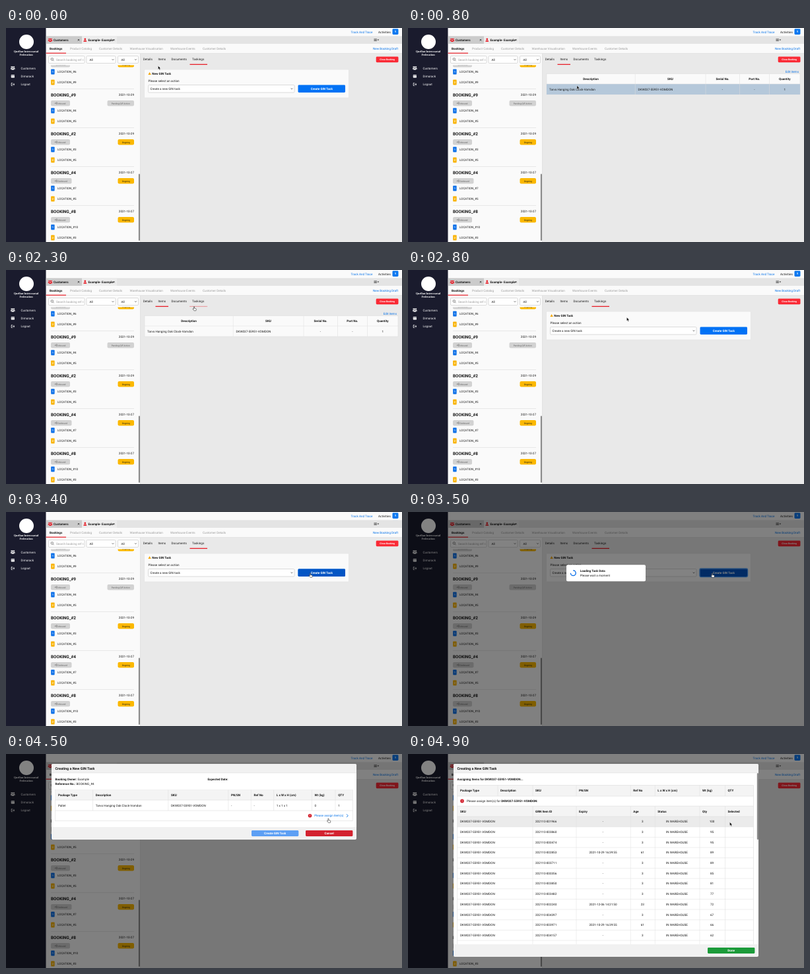
Write an HTML page that moves like this. It is 600 px wide and 325 px high and loops after 5000 ms.

```html
<!DOCTYPE html>
<html lang="en">
<head>
<meta charset="utf-8">
<title>Warehouse bookings</title>
<style>
html, body { margin: 0; width: 100%; height: 100%; overflow: hidden; background: #e9e9e9; }
svg { display: block; width: 600px; height: 325px; font-family: Roboto, sans-serif; text-rendering: geometricPrecision; }
text { white-space: pre; }
</style>
</head>
<body>
<svg id="stage" viewBox="0 0 600 325"></svg>
<script>
const INK = '#161616', BLUE = '#0070e8', RED = '#e8202a', LINE = '#dcdcdc';
const SKU = 'DKW037-55951-VOMDON', ITEM = 'Tarvo Hanging Oak Clock-Vomdon';

const text = (s, x, y, { fill = INK, size = 4.6, weight = 400, anchor = 'start', more = '' } = {}) =>
  `<text x="${x}" y="${y}" fill="${fill}" font-size="${size}" font-weight="${weight}" text-anchor="${anchor}" ${more}>${s}</text>`;
const bold = (s, x, y, o) => text(s, x, y, { weight: 700, ...o });
const mid = (s, x, y, o) => text(s, x, y, { anchor: 'middle', ...o });
const box = (x1, y1, x2, y2, fill, r = 0, more = '') =>
  `<rect x="${x1}" y="${y1}" width="${x2 - x1}" height="${y2 - y1}" rx="${r}" fill="${fill}" ${more}/>`;
const path = (d, stroke = INK, width = .6, fill = 'none', more = '') =>
  `<path d="${d}" stroke="${stroke}" stroke-width="${width}" fill="${fill}" ${more}/>`;
const dot = (x, y, r, fill) => `<circle cx="${x}" cy="${y}" r="${r}" fill="${fill}"/>`;
const group = (id, ...parts) => `<g id="${id}">${parts.join('')}</g>`;
const columns = (xs, y1, y2) => path(xs.map(x => `M${x} ${y1}V${y2}`).join(''), LINE, .5);
const chevron = (x, y) => path(`M${x - 1.2} ${y - .6}l1.2 1.2 1.2-1.2`, INK, .7);
const button = (label, x1, y1, x2, y2, fill, size = 4.6) =>
  box(x1, y1, x2, y2, fill, 1.4) +
  mid(label, (x1 + x2) / 2, (y1 + y2) / 2 + size * .35, { fill: '#fff', size, weight: 700 });
const select = (label, x1, y1, x2, y2, tx) =>
  box(x1, y1, x2, y2, '#fff', 1.4, 'stroke="#c4c4c4" stroke-width=".6"') +
  text(label, tx, (y1 + y2) / 2 + 1.6) + chevron(x2 - 4, (y1 + y2) / 2);
const people = (x, y, fill) => [[-2, -.6, 1], [2, -.6, 1], [0, 0, 1.3]].map(([dx, dy, k]) =>
  dot(x + dx, y + dy - 1.2 * k, .9 * k, fill) +
  path(`M${x + dx - 1.5 * k} ${y + dy + 2 * k}q0-2 ${1.5 * k}-2t${1.5 * k} 2z`, 'none', 0, fill)).join('');
const alertDot = (x, y) => dot(x, y, 2.8, '#d3222f') + mid('!', x, y + 1.4, { fill: '#fff', size: 4, weight: 700 });

function sidebar() {
  const white = { fill: '#fff' }, serif = { ...white, size: 4.3, weight: 700, more: 'font-family="Liberation Serif, serif"' };
  return box(0, 0, 60.7, 325, '#1a1b2d') + dot(31, 21, 11, '#fff') +
    mid('Quellan Intercoastal', 30.5, 37.4, serif) + mid('Federation', 30.5, 42.4, serif) +
    people(10.3, 61, '#fff') +
    box(7.7, 71, 13, 75.4, '#fff', .7) + path('M7.7 72.6h5.3', '#1a1b2d', .6) +
    path('M9.8 83.6h-1.6v4h1.6M9.6 85.6h3M11.4 84l1.6 1.6-1.6 1.6', '#fff', .8) +
    text('Customers', 22.5, 62.6, white) + text('Dimorack', 22.5, 75, white) + text('Logout', 22.5, 87.4, white);
}

function topBars() {
  const gray = { fill: '#9a9a9a' };
  return box(60.7, 0, 600, 12.5, '#fafafa') + box(60.7, 12.5, 600, 24, '#e4e4e4') +
    text('Track And Trace', 522.5, 7.6, { fill: BLUE }) + text('Activities', 564, 8) +
    box(585.5, 1.3, 594.5, 10, '#0b78f0', 1.4) + mid('9', 590, 7.4, { fill: '#fff' }) +
    box(60.7, 12.5, 115, 24, '#cbcbcb') + box(115, 12.5, 168, 24, '#ececec') +
    people(67, 18.4, RED) + bold('Customers', 72, 20) +
    dot(119.8, 16.9, 1.4, RED) + path('M117.3 20.8q0-2.4 2.5-2.4t2.5 2.4z', 'none', 0, RED) +
    bold('Example- Example', 124.5, 20) +
    [110, 163.5].map(x => path(`M${x - 1.2} 17l2.4 2.4m0-2.4l-2.4 2.4`, INK, .7)).join('') +
    path('M557.5 16.8h4.4m-4.4 1.3h4.4m-4.4 1.3h4.4', INK, .6) + path('M562.6 17.4h2.6l-1.3 1.6z', 'none', 0, INK) +
    box(60.7, 24, 600, 38.5, '#fafafa') + path('M60.7 38.6H600', LINE, .6) +
    bold('Bookings', 66, 33) + box(60.7, 37.6, 91, 38.8, RED) +
    [['Product Catalog', 97], ['Customer Details', 141], ['Warehouse Visualisation', 187.5],
     ['Warehouse Events', 249], ['Customer Details', 298]].map(([s, x]) => text(s, x, 33, gray)).join('') +
    text('New Booking Draft', 556, 33.2, { fill: BLUE });
}

function booking([id, date, way, status, from, to], i) {
  const y = 43 + 59 * i, small = { size: 3.3, fill: '#5c5c5c' }, pending = status !== 'Ongoing';
  const pin = (n, cy, fill) => box(68.2, cy - 4, 73.6, cy + 4, fill, .7) +
    mid(n, 70.9, cy + 1.4, { fill: '#fff', size: 4, weight: 700 });
  return bold('BOOKING_#' + id, 68, y + 2.4, { size: 6.4 }) + text('2021-10-' + date, 194, y + .8, { anchor: 'end' }) +
    box(68, y + 8, 97 + (way === 'Outbound' ? 2.5 : 0), y + 16.6, '#d2d2d2', 2) +
    path(`M73.5 ${y + 12.3}h2.6m-1-1l1 1-1 1M76.2 ${y + 10.8}h1v3h-1`, '#5c5c5c', .5) + text(way, 78.5, y + 13.5, small) +
    box(pending ? 153.5 : 169.5, y + 8, 194, y + 16.6, pending ? '#d2d2d2' : '#fbb800', 2) +
    mid(status, pending ? 173.8 : 181.8, y + 13.5, pending ? small : { size: 3.3 }) +
    pin(1, y + 23.5, '#0b6fe8') + text('LOCATION_#' + from, 78, y + 25.2, { size: 4.5 }) +
    pin(2, y + 39.5, '#f9b200') + text('LOCATION_#' + to, 78, y + 41.1, { size: 4.5 }) +
    path(`M68 ${y + 49.5}H194`, LINE, .6);
}

function bookingList() {
  const rows = [[7, 29, 'Inbound', 'Ongoing', 6, 9], [9, 29, 'Inbound', 'Pending QIF Action', 4, 5],
    [2, 29, 'Inbound', 'Ongoing', 3, 5], [4, 27, 'Outbound', 'Ongoing', 7, 5], [8, 27, 'Inbound', 'Ongoing', 10, 3]];
  return box(60.7, 39, 203.5, 325, '#fafafa') +
    `<clipPath id="list"><rect x="61" y="56.5" width="140" height="269"/></clipPath>` +
    `<clipPath id="field"><rect x="65" y="42" width="52.5" height="12"/></clipPath>` +
    `<g clip-path="url(#list)">${rows.map(booking).join('')}</g>` +
    box(64.5, 42.5, 119, 53.5, '#fff', 1.4, 'stroke="#c4c4c4" stroke-width=".6"') +
    path('M71 48.6l1.6 1.6M71.5 47.3a1.7 1.7 0 1 1-3.4 0a1.7 1.7 0 1 1 3.4 0', '#555', .7) +
    text('Search booking ref no.', 76, 49.6, { fill: '#999', more: 'clip-path="url(#field)"' }) +
    select('All', 122, 42.5, 166, 53.5, 126.5) + select('All', 169.5, 42.5, 200.5, 53.5, 174.5) +
    box(200.9, 221.5, 203, 323, '#8b8b8b', 1) + path('M203.6 39V325', '#d0d0d0', .5);
}

function itemsTab() {
  const heads = [['Description', 277], ['SKU', 397.5], ['Serial No.', 476.5], ['Part No.', 524.8], ['Quantity', 570.8]];
  return box(226.5, 54.7, 246, 56, RED) + text('Edit items', 592, 67.8, { fill: BLUE, anchor: 'end' }) +
    box(210, 69.5, 594, 101, '#fafafa', 0, `stroke="${LINE}" stroke-width=".5"`) +
    group('rowHover', box(210, 85, 594, 101, '#b5c8da')) +
    path('M210 85H594', LINE, .5) + columns([344.3, 451, 502.5, 547.5], 69.5, 101) +
    heads.map(([s, x]) => mid(s, x, 78.9, { weight: 700 })).join('') +
    text(ITEM, 214, 94.6) + text(SKU, 348.5, 94.6) + mid('-', 476.5, 94.6) + mid('-', 524.8, 94.6) + mid('1', 570.8, 94.6);
}

function taskTab() {
  return box(278.5, 54.7, 305, 56, RED) +
    box(209.5, 63, 519.5, 106, '#fafafa', 1, `stroke="${LINE}" stroke-width=".5"`) +
    path('M215.4 71l2.2-4 2.2 4z', 'none', 0, '#f5a800') + bold('New GIN Task', 221.3, 70.8) +
    text('Please select an action', 215.5, 81.7) + select('Create a new GIN task', 215.5, 86.5, 437, 98, 218.5) +
    button('Create GIN Task', 442.5, 86.5, 514, 98, '#0072f5') +
    group('buttonHover', button('Create GIN Task', 442.5, 86.5, 514, 98, '#0355c4')) +
    group('buttonFocus', box(441.9, 85.9, 514.6, 98.6, 'none', 1.8, 'stroke="#4a9af5" stroke-width="1.2"'));
}

const loading = () => box(240, 80.3, 360, 105.2, '#fff', 2) +
  bold('Loading Task Data', 260.7, 91.2) + text('Please wait a moment', 260.7, 98) +
  `<g transform="translate(250.3 92.7)">${path('M0-3.9A3.9 3.9 0 1 1-3.9 0', '#0b6fe8', 1.4, 'none', 'id="spinner"')}</g>`;

const modalFrame = bottom => box(69, 15, 531, bottom, '#fff', 2.4) +
  path('M69 28.5V17.4Q69 15 71.4 15H528.6Q531 15 531 17.4V28.5z', 'none', 0, '#f1f1f1') + path('M69 28.6H531', LINE, .6) +
  bold('Creating a New GIN Task', 74.6, 24, { size: 5.4 }) +
  path(`M69 ${bottom - 19}H531V${bottom - 2.4}q0 2.4-2.4 2.4H71.4q-2.4 0-2.4-2.4z`, 'none', 0, '#f1f1f1');

function taskModal() {
  const xs = [79, 135.7, 250, 341, 375.5, 409.8, 467.6, 503.2];
  const heads = ['Package Type', 'Description', 'SKU', 'PN/SN', 'Ref No', 'L x W x H (cm)', 'Wt (kg)', 'QTY'];
  const cells = ['Pallet', ITEM, SKU, '-', '-', '1 x 1 x 1', '0', '1'];
  return modalFrame(130) +
    bold('Booking Owner: <tspan font-weight="400">Example</tspan>', 74.6, 39.9) +
    bold('Reference No.: <tspan font-weight="400">BOOKING_#4</tspan>', 74.6, 46.6) + bold('Expected Date:', 305.5, 39.9) +
    box(74.6, 54.3, 525.4, 101.6, 'none', 0, `stroke="${LINE}" stroke-width=".6"`) + box(74.6, 54.3, 525.4, 70, '#f4f4f4') +
    path('M74.6 70H525.4M74.6 86H525.4', LINE, .6) + columns(xs.slice(1).map(x => x - 4.2), 54.3, 86) +
    heads.map((s, i) => bold(s, xs[i], 63.9)).join('') + cells.map((s, i) => text(s, xs[i], 79.8)).join('') +
    alertDot(460.5, 93.7) + text('Please assign item(s)', 467.3, 95.4, { fill: BLUE }) +
    path('M516 91.4l2.2 2.3-2.2 2.3', BLUE, .9) +
    button('Create GIN Task', 372, 116, 443.3, 125, '#5d9ff4') + button('Cancel', 454, 116, 525.4, 125, '#d3222f');
}

function assignModal() {
  const edges = [189, 255, 337.3, 374.3, 442, 480.5], step = 15.68;
  const ids = ['001966', '003860', '000474', '002853', '003711', '000356', '003850', '003482', '002240', '004397', '003971', '004157'];
  const qty = [100, 95, 95, 89, 89, 85, 81, 77, 72, 67, 66, 62];
  const special = { 3: ['2021-10-29 16:39:55', 61], 8: ['2021-12-06 14:21:50', 23], 10: ['2021-10-29 16:39:55', 61] };
  const row = (id, i) => {
    const y = 95 + step * i, b = y + 9.4, [expiry, age] = special[i] || ['-', 3];
    return path(`M74.6 ${y + step}H523.5`, LINE, .5) + text(SKU, 79, b) + text('202110-' + id, 193, b) +
      mid(expiry, 295.5, b) + mid(age, 355.3, b) + mid('IN WAREHOUSE', 407.5, b) + mid(qty[i], 460.5, b);
  };
  const heads = (list, y) => list.map(([s, x]) => bold(s, x, y)).join('');
  return modalFrame(308) + bold(`Assigning Items for ${SKU}...`, 74.6, 40.4) +
    box(74.6, 47.5, 523.5, 64, '#f4f4f4') + box(74.6, 79.2, 523.5, 95, '#f4f4f4') + box(74.6, 95, 523.5, 95 + step, '#ebebeb') +
    heads([['Package Type', 79], ['Description', 140], ['SKU', 193], ['PN/SN', 259], ['Ref No', 341.3],
      ['L x W x H (cm)', 378.3], ['Wt (kg)', 446], ['QTY', 484.5]], 57.2) +
    alertDot(82, 71.4) + text(`Please assign item(s) for <tspan font-weight="700">${SKU}:</tspan>`, 89, 73.1) +
    heads([['SKU', 79], ['GRN Item ID', 193], ['Expiry', 259], ['Age', 341.3], ['Status', 378.3], ['Qty', 446], ['Selected', 484.5]], 88.6) +
    path('M74.6 47.5H523.5M74.6 64H523.5M74.6 79.2H523.5M74.6 95H523.5M74.6 47.5V289M523.5 47.5V289', LINE, .6) +
    columns([136, ...edges], 47.5, 64) + columns(edges, 79.2, 289) + ids.map(row).join('') +
    box(528.8, 29, 531, 130, '#8b8b8b', 1) + button('Done', 454, 294, 525.4, 303, '#1c9b3a');
}

const $ = id => document.getElementById(id);
$('stage').innerHTML = box(0, 0, 600, 325, '#e9e9e9') + sidebar() + topBars() + bookingList() +
  [['Details', 207.8], ['Items', 230.5], ['Documents', 250.5], ['Taskings', 282]].map(([s, x]) => text(s, x, 49)).join('') +
  button('Close Booking', 560.7, 43.6, 594.5, 52.2, '#fa2a35', 3.5) +
  group('itemsTab', itemsTab()) + group('taskTab', taskTab()) +
  group('tabHover', path('M278.5 55.3H305', RED, .8, 'none', 'stroke-dasharray="1 .8"')) +
  group('shade', box(0, 0, 600, 325, 'rgba(0,0,0,.49)')) +
  group('loading', loading()) + group('taskModal', taskModal()) + group('assignModal', assignModal()) +
  group('cursor',
    group('arrow', path('M0 0v5.3l1.2-1.1.9 2 1-.4-.9-1.9h1.7z', '#fff', .4, '#000')),
    group('hand', path('M-.6.2q.6-.6 1.1 0v2.4l2.2.5q.7.2.6 1l-.5 2.2h-2.9l-2-2.6q.2-.8 1-.3l.5.5z', '#111', .5, '#fff')));

// Pointer stops: time, x, y
const stops = [[0, 230.5, 57.5], [200, 235.5, 48], [500, 235.5, 48], [800, 256, 87.5], [1100, 268, 93], [1700, 276, 95],
  [2100, 284, 70], [2300, 285, 55.5], [2500, 285, 55.5], [2900, 340, 75], [3300, 461, 93], [4100, 461, 93],
  [4500, 488.5, 98], [4700, 488.5, 98], [4800, 487.5, 103.5], [5000, 487.5, 103.5]];

function pointer(t) {
  const i = stops.findIndex(s => s[0] > t), [t0, x0, y0] = stops[i - 1], [t1, x1, y1] = stops[i];
  const k = (t - t0) / (t1 - t0), e = k * k * (3 - 2 * k);
  return [x0 + (x1 - x0) * e, y0 + (y1 - y0) * e];
}

function draw(now) {
  const t = Math.floor(now % 5000 / 100) * 100;
  const within = (a, b) => t >= a && t < b;
  const [x, y] = pointer(t), items = within(300, 2500);
  const hand = within(100, 600) || within(2200, 2600) || within(3300, 3900) || within(4400, 4700);
  const visible = {
    itemsTab: items, taskTab: !items, rowHover: items && y > 85 && y < 101, tabHover: within(2200, 2500),
    buttonHover: within(3200, 5000), buttonFocus: t >= 3500, shade: t >= 3500, loading: within(3500, 3900),
    taskModal: within(3900, 4700), assignModal: t >= 4700, hand, arrow: !hand
  };
  for (const id in visible) $(id).style.display = visible[id] ? '' : 'none';
  $('spinner').setAttribute('transform', `rotate(${(t - 3500) * .8})`);
  $('cursor').setAttribute('transform', `translate(${x} ${y})`);
  requestAnimationFrame(() => draw(performance.now() - start));
}
const start = performance.now();
draw(0);
</script>
</body>
</html>
```
